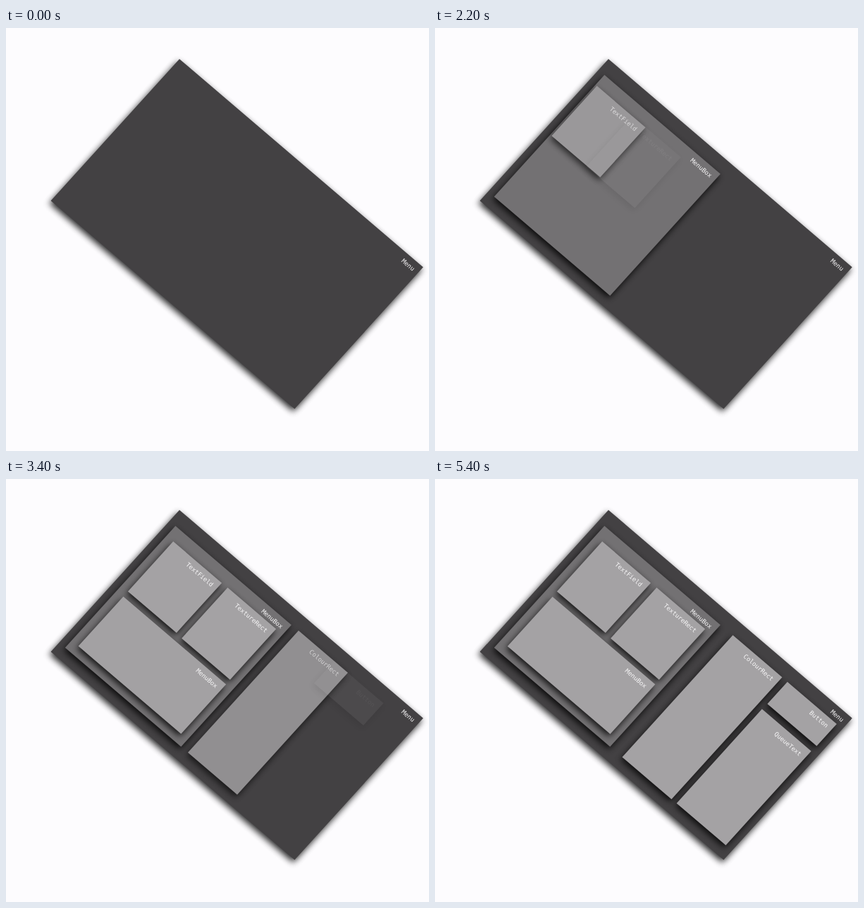
These frames come from a looping animation (600x600 px, 6000 ms). An HTML page:

```html
<!DOCTYPE html>
<html lang="en">
<head>
<meta charset="utf-8">
<title>Menu layout</title>
<style>
  html, body { margin: 0; width: 100%; height: 100%; overflow: hidden; background: #fdfcfe; }
  svg { display: block; width: 100vw; height: 100vh; }
  text { font: 8.8px "DejaVu Sans Mono", monospace; fill: #f8f7f8; text-anchor: end; }
</style>
</head>
<body>
<svg viewBox="0 0 600 600">
  <defs>
    <filter id="blur" filterUnits="userSpaceOnUse" x="-60" y="-40" width="570" height="360">
      <feGaussianBlur stdDeviation="4.8"/>
    </filter>
  </defs>
  <g id="plane" transform="matrix(.7605 .6495 -.672 .741 246 44)"></g>
</svg>
<script>
const LOOP = 6000, STEP = 100, DURATION = 1000, SLIDE = 50;
const DARK = '#434143', MID = '#737173', LIGHT = '#a4a2a4';

// Positions are in the tilted plane; start is null for the fixed backdrop.
const panels = [
  { label: 'Menu', x: 0, y: 0, w: 454.6, h: 271.4, fill: DARK, start: null },
  { label: 'MenuBox', x: 11, y: 20.8, w: 216.3, h: 233, fill: MID, start: 550 },
  { label: 'TextField', x: 23.4, y: 39.6, w: 90.6, h: 95.6, fill: LIGHT, start: 1700 },
  { label: 'TextureRect', x: 124.6, y: 39.2, w: 90.4, h: 97.2, fill: LIGHT, start: 2100 },
  { label: 'MenuBox', x: 23.8, y: 145, w: 191.6, h: 95, fill: LIGHT, start: 2500 },
  { label: 'ColourRect', x: 250, y: 20.3, w: 92, h: 233.6, fill: LIGHT, start: 2900 },
  { label: 'Button', x: 351.9, y: 20.5, w: 92, h: 42.3, fill: LIGHT, start: 3300 },
  { label: 'QueueText', x: 351.1, y: 73.2, w: 91.8, h: 180.3, fill: LIGHT, start: 3700, drop: 2.5 }
];

function add(parent, tag, attrs) {
  const node = document.createElementNS('http://www.w3.org/2000/svg', tag);
  for (const key in attrs) node.setAttribute(key, attrs[key]);
  return parent.appendChild(node);
}

function build(panel) {
  const { x, y, w, h, fill, label, drop = 0 } = panel;
  panel.node = add(document.getElementById('plane'), 'g', {});
  add(panel.node, 'rect', {
    x: x + 1, y: y + 4, width: w, height: h, opacity: .85, filter: 'url(#blur)'
  });
  add(panel.node, 'rect', { x, y, width: w, height: h, fill });
  add(panel.node, 'text', { x: x + w - 7.5, y: y + 14.3 + drop }).textContent = label;
}

// cubic-bezier(.25, .1, .25, 1), solved by bisection
function ease(p) {
  if (p <= 0) return 0;
  if (p >= 1) return 1;
  const bezier = (s, a, b) => 3 * a * s * (1 - s) ** 2 + 3 * b * s * s * (1 - s) + s ** 3;
  let low = 0, high = 1;
  for (let i = 0; i < 24; i++) {
    const mid = (low + high) / 2;
    if (bezier(mid, .25, .25) < p) low = mid; else high = mid;
  }
  return bezier(low, .1, 1);
}

function render(time) {
  const t = Math.floor(time % LOOP / STEP) * STEP;
  for (const { node, start } of panels) {
    if (start === null) continue;
    // The first faint moment of a panel stays hidden.
    const p = (t - start) / DURATION;
    const shown = p <= .05 ? 0 : ease(p);
    node.setAttribute('opacity', shown);
    node.setAttribute('transform', `translate(${SLIDE * (shown - 1)} 0)`);
  }
}

panels.forEach(build);
const origin = performance.now();
function tick() {
  render(performance.now() - origin);
  requestAnimationFrame(tick);
}
tick();
</script>
</body>
</html>
```
